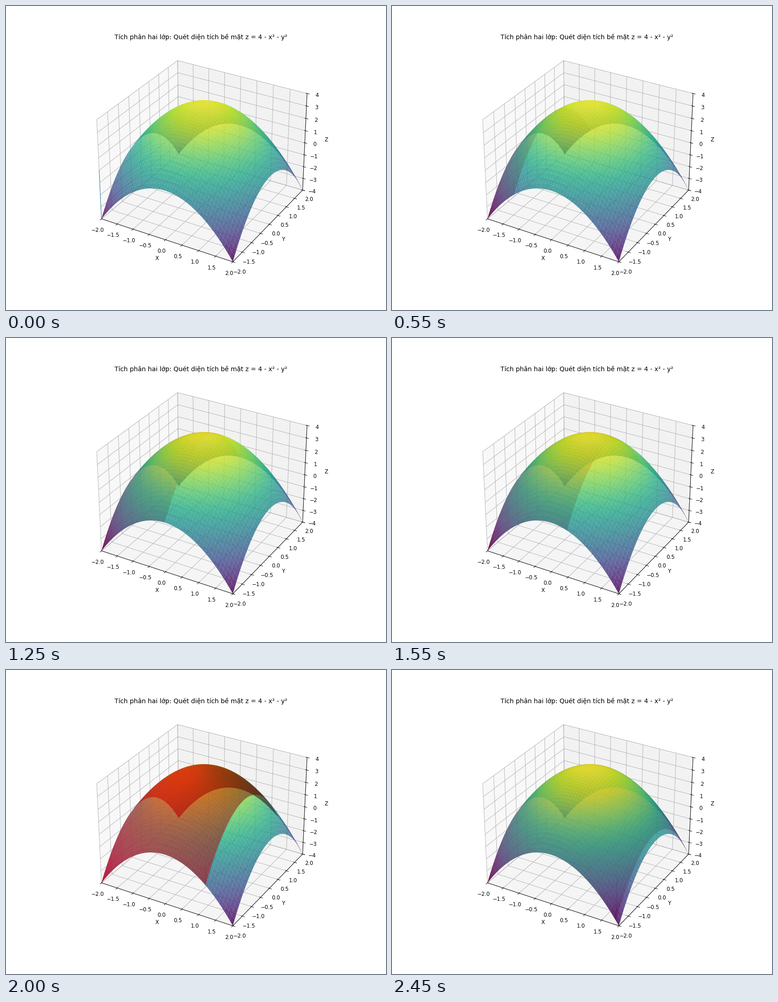
These frames come from a looping animation (837x669 px, 2.5 s). A matplotlib script:

```python
import numpy as np
import matplotlib.pyplot as plt
from matplotlib.animation import FuncAnimation

FRAMES = 50
GRID = 50
LOW, HIGH = -2, 2
DPI = 83.7

plt.rcParams["font.family"] = "DejaVu Sans"


def height(x, y):
    return 4 - x**2 - y**2


def patch(x_end):
    """Grid of the surface from the left edge up to x_end."""
    x, y = np.meshgrid(np.linspace(LOW, x_end, GRID),
                       np.linspace(LOW, HIGH, GRID))
    return x, y, height(x, y)


# The small surplus keeps the pixel size from rounding down.
fig = plt.figure(figsize=(837.01 / DPI, 669.01 / DPI), dpi=DPI)
ax = fig.add_subplot(111, projection="3d")
ax.set(xlim=(LOW, HIGH), ylim=(LOW, HIGH), zlim=(-4, 4),
       xlabel="X", ylabel="Y", zlabel="Z")
ax.set_title("Tích phân hai lớp: Quét diện tích bề mặt z = 4 - x² - y²")

ax.plot_surface(*patch(HIGH), cmap="viridis", alpha=0.8)
stem, = ax.plot([], [], [], color="tab:blue", lw=1, alpha=0.7)
swept = []


def update(frame):
    x_end = LOW + (HIGH - LOW) * frame / FRAMES
    while swept:
        swept.pop().remove()
    # Depth sorting decides whether the red sheet lies over the base.
    if frame:
        swept.append(ax.plot_surface(*patch(x_end), color="red", alpha=0.5))
    stem.set_data_3d([x_end, x_end], [LOW, LOW], [0, height(x_end, LOW)])
    return [stem, *swept]


anim = FuncAnimation(fig, update, frames=FRAMES, interval=50,
                     init_func=lambda: [stem], repeat=True, repeat_delay=0)
plt.show()
```
